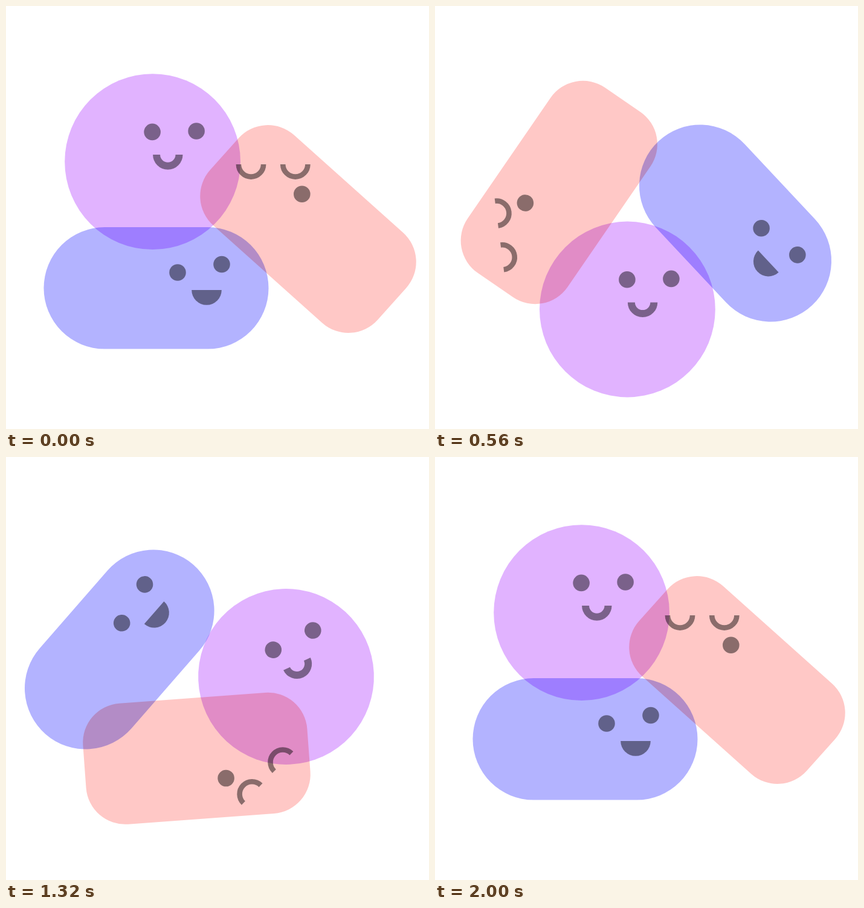
These frames come from a looping animation (700x700 px, 2360 ms). An HTML page with a canvas:

```html
<!DOCTYPE html>
<html lang="en">
<head>
<meta charset="utf-8">
<title>Tumbling friends</title>
<style>
  html, body { margin: 0; width: 100%; height: 100%; overflow: hidden; background: #fff; }
  canvas { display: block; width: 700px; height: 700px; }
</style>
</head>
<body>
<canvas id="stage" width="700" height="700"></canvas>
<script>
const ctx = document.getElementById('stage').getContext('2d');
const LOOP = 2360, STEP = 40, TAU = Math.PI * 2;
const INK = '#8a8a8a'; // multiplied onto each body
const rad = deg => deg * Math.PI / 180;
const pose = (x, y, turn = 0) => ({ x, y, turn });

// Each move eases from one resting pose to the next, passing a midway pose at `mid`
const moves = [
  { start: 0, mid: 240, end: 560, power: 1 },
  { start: 800, mid: 960, end: 1320, power: 1.05 },
  { start: 1560, mid: 1720, end: 2000, power: 0.75 }
];

// Paths alternate resting and midway poses and close on themselves after `spin` degrees
const pill = {
  color: '#b3b3ff',
  spin: 0,
  path: [pose(248.5, 466.8), pose(399.5, 470.4, 21.6), pose(497, 359.5, 46.9),
         pose(435, 300.8, 21.5), pose(187.8, 318.5, -48.9), pose(178.8, 416, -31.7)],
  draw() {
    box(372, 201.6, 100.8, 0);
    ink();
    dot(35.5, -25.8);
    dot(108.5, -39.3);
    disc(83.5, 3.2, 24.8, Math.PI);
  }
};

const brick = {
  color: '#ffc8c6',
  spin: -360,
  path: [pose(500, 369), pose(368.8, 288.6, -42.5), pose(205.3, 308.5, -97.3),
         pose(184.5, 388.8, -131.4), pose(315.5, 498.8, -226), pose(410.3, 485.4, -258.2)],
  draw() {
    box(372, 200.6, 65, 41.8);
    ink();
    smile(-94.5, -107, 20.6, 8.6);
    smile(-21.2, -107, 20.6, 8.6);
    dot(-10.2, -57.7);
  }
};

const ball = {
  color: '#e1b3ff',
  spin: 0,
  path: [pose(242.6, 257.6), pose(165.5, 431), pose(318.4, 502),
         pose(394.1, 497, -7), pose(463.5, 363.5, -25), pose(386.2, 273.2, -8)],
  draw() {
    disc(0, 0, 145.4, TAU);
    ink();
    dot(-0.5, -49.2);
    dot(72.5, -50.6);
    smile(25.2, -11.6, 18.7, 12);
  }
};

function ink() {
  ctx.fillStyle = ctx.strokeStyle = INK;
}

function disc(x, y, r, sweep) {
  ctx.beginPath();
  ctx.arc(x, y, r, 0, sweep);
  ctx.fill();
}

function dot(x, y) {
  disc(x, y, 13.8, TAU);
}

function smile(x, y, r, width) {
  ctx.lineWidth = width;
  ctx.beginPath();
  ctx.arc(x, y, r, 0, Math.PI);
  ctx.stroke();
}

function box(w, h, r, tilt) {
  ctx.save();
  ctx.rotate(rad(tilt));
  ctx.beginPath();
  ctx.roundRect(-w / 2, -h / 2, w, h, r);
  ctx.fill();
  ctx.restore();
}

function progress({ start, end, power }, time) {
  const p = Math.min(1, (time - start) / (end - start)) ** power;
  return p * p * (3 - 2 * p);
}

// Quadratic curve from a to b that passes through m at progress `via`
function curve(a, m, b, via, u) {
  const straight = t => a + (b - a) * t;
  return straight(u) + (m - straight(via)) * u * (1 - u) / (via * (1 - via));
}

function poseAt({ path, spin }, time) {
  const i = moves.findLastIndex(move => time >= move.start);
  const via = progress(moves[i], moves[i].mid);
  const u = progress(moves[i], time);
  const closing = { ...path[0], turn: spin };
  const [a, m, b] = [...path, closing].slice(2 * i);
  const blend = key => curve(a[key], m[key], b[key], via, u);
  return pose(blend('x'), blend('y'), blend('turn'));
}

function render(time) {
  ctx.globalCompositeOperation = 'source-over';
  ctx.fillStyle = '#fff';
  ctx.fillRect(0, 0, 700, 700);
  ctx.globalCompositeOperation = 'multiply';
  for (const friend of [pill, brick, ball]) {
    const { x, y, turn } = poseAt(friend, time);
    ctx.save();
    ctx.translate(x, y);
    ctx.rotate(rad(turn));
    ctx.fillStyle = friend.color;
    friend.draw();
    ctx.restore();
  }
}

const began = performance.now();
function tick() {
  const time = (performance.now() - began) % LOOP;
  render(Math.floor(time / STEP) * STEP);
  requestAnimationFrame(tick);
}
tick();
</script>
</body>
</html>
```
